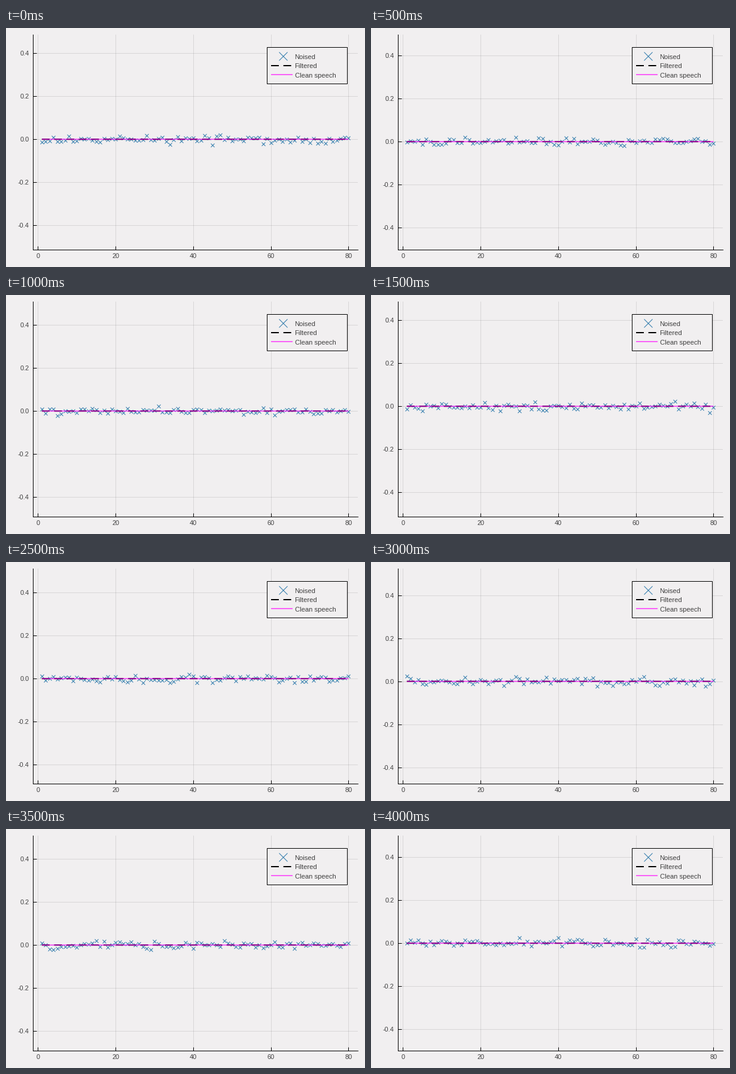
A matplotlib script that plays this animation: 600x400 px, repeating every 4500 ms.

```python
import matplotlib.pyplot as plt
import numpy as np
from matplotlib.animation import FuncAnimation
from matplotlib.patches import Rectangle

W, H, DPI = 600, 400, 100
PX = 72 / DPI                        # points per pixel
LEFT, RIGHT, TOP, BOTTOM = 45.2, 588, 11.4, 371.4
X0, X_STEP = 53.4, 6.488             # pixel of x=0, pixels per sample
PAPER, INK, BLUE = "#f1eff0", "#404040", "#2a78aa"
N, STEP, SIGMA = 80, 500, 0.0105

# first sample of every step, in thousandths; the view is centred on it
FIRST = [-14.4, -3.3, 7.8, -14.4, 2.2, 10.6, 23.1, 7.8, -0.6]

BLACK_DASH = dict(color="black", linewidth=2 * PX, linestyle=(0, (6.5, 3.8)),
                  dash_capstyle="butt")
PINK_LINE = dict(color="#ff00ff", alpha=0.65, linewidth=1.8 * PX,
                 solid_capstyle="butt")
CROSS = dict(marker="x", linestyle="none", color=BLUE, markeredgewidth=PX)

plt.rcParams["font.family"] = "Liberation Sans"
fig = plt.figure(figsize=(W / DPI, H / DPI), dpi=DPI, facecolor=PAPER)

# chart
ax = fig.add_axes([LEFT / W, 1 - BOTTOM / H, (RIGHT - LEFT) / W, (BOTTOM - TOP) / H],
                  facecolor="none")
ax.set_xlim((LEFT - X0) / X_STEP, (RIGHT - X0) / X_STEP)
ax.set_xticks(range(0, N + 1, 20))
levels = np.arange(-2, 3) / 5
ax.set_yticks(levels, [f"{v:.1f}" for v in levels])
ax.tick_params(direction="in", length=6 * PX, width=PX, color="black",
               labelsize=11 * PX, labelcolor=INK)
ax.tick_params(axis="x", pad=5.5 * PX)
ax.tick_params(axis="y", pad=6.5 * PX)
ax.grid(color="black", alpha=0.1, linewidth=PX)
ax.set_axisbelow(True)
ax.spines[["top", "right"]].set_visible(False)
ax.spines[["left", "bottom"]].set_linewidth(PX)

noised, = ax.plot(np.arange(1, N + 1), np.zeros(N), markersize=6 * PX, zorder=3, **CROSS)
ax.plot([1, N], [0, 0], zorder=4, snap=False, **BLACK_DASH)
ax.plot([1, N], [0, 0], zorder=5, snap=False, **PINK_LINE)

# legend, in stage pixels
key = fig.add_axes([0, 0, 1, 1])
key.set(xlim=(0, W), ylim=(H, 0))
key.axis("off")
key.add_patch(Rectangle((436.2, 32.2), 134, 61, facecolor=PAPER, edgecolor="black",
                        linewidth=PX))
key.plot([463], [47.2], markersize=14 * PX, **CROSS)
key.plot([443, 478], [63, 63], **BLACK_DASH)
key.plot([443, 478.5], [78, 78], **PINK_LINE)
for row, label in enumerate(("Noised", "Filtered", "Clean speech")):
    key.text(482.6, 51.8 + 15.4 * row, label, size=11.2 * PX, color=INK, va="baseline")


def draw(step):
    y = np.random.default_rng(40 + step).normal(0, SIGMA, N).clip(-0.03, 0.03)
    y[0] = FIRST[step] / 1000
    noised.set_ydata(y)
    ax.set_ylim(y[0] - 0.5, y[0] + 0.5)
    return noised,


anim = FuncAnimation(fig, draw, frames=len(FIRST), interval=STEP, repeat=True,
                     repeat_delay=0, blit=False)
plt.show()
```
